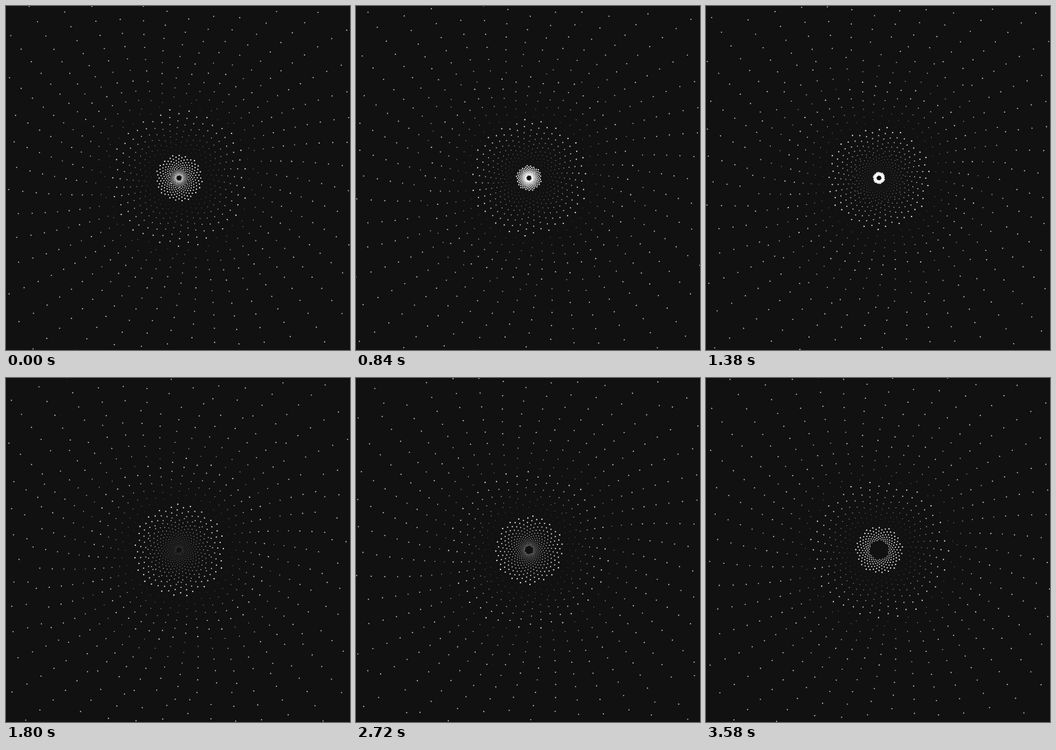
Recreate the animation shown at these times as an HTML page with a canvas. Size 500 by 500 pixels, loop 3.6 s.

```html
<!DOCTYPE html>
<html lang="en">
<head>
<meta charset="utf-8">
<title>Spiral dots</title>
<style>
  html, body { margin: 0; width: 100%; height: 100%; overflow: hidden; background: #111; }
  canvas { display: block; width: 500px; height: 500px; }
</style>
</head>
<body>
<canvas id="stage" width="500" height="500"></canvas>
<script>
const ctx = document.getElementById('stage').getContext('2d');
const LOOP = 3600, STEP = 20;
const CX = 251.5, CY = 250;
const COUNT = 600, LAPS = 3;          // dots released per loop, loops each one lives
const REF_AGE = 1705, REF_R = 320.4;  // one known dot fixes the scale
const TURN = 220.25 * Math.PI / 180 - (REF_AGE - 2 * COUNT);
const RING = 67, RING_START = 34;     // brightness rings that drift inward

const frac = x => x - Math.floor(x);
const clamp = x => Math.max(0, Math.min(1, x));
const radius = age => REF_R * (age / REF_AGE) ** 3;

function drawDot(x, y, size, alpha) {
  ctx.globalAlpha = alpha;
  ctx.beginPath();
  ctx.arc(x, y, size, 0, 2 * Math.PI);
  ctx.fill();
}

function draw(t) {
  ctx.globalAlpha = 1;
  ctx.fillStyle = '#111';
  ctx.fillRect(0, 0, 500, 500);
  ctx.fillStyle = '#fff';
  for (let i = 0; i < COUNT; i++) {
    const cos = Math.cos(i + TURN), sin = Math.sin(i + TURN);
    for (let lap = 0; lap < LAPS; lap++) {
      const r = radius(i + COUNT * (t + lap));
      if (r < 4 || r > 356) continue;
      const wave = frac((r - RING_START) / RING + t);
      const far = clamp((r - 70) / 130);
      const level = wave + (0.75 - wave) * far;
      drawDot(CX + r * cos, CY + r * sin, 0.4 + 0.6 * level, 0.2 + 0.8 * level);
    }
  }
}

function frame(now) {
  draw(Math.floor((now % LOOP) / STEP) * STEP / LOOP);
  requestAnimationFrame(frame);
}
draw(0);
requestAnimationFrame(frame);
</script>
</body>
</html>
```
